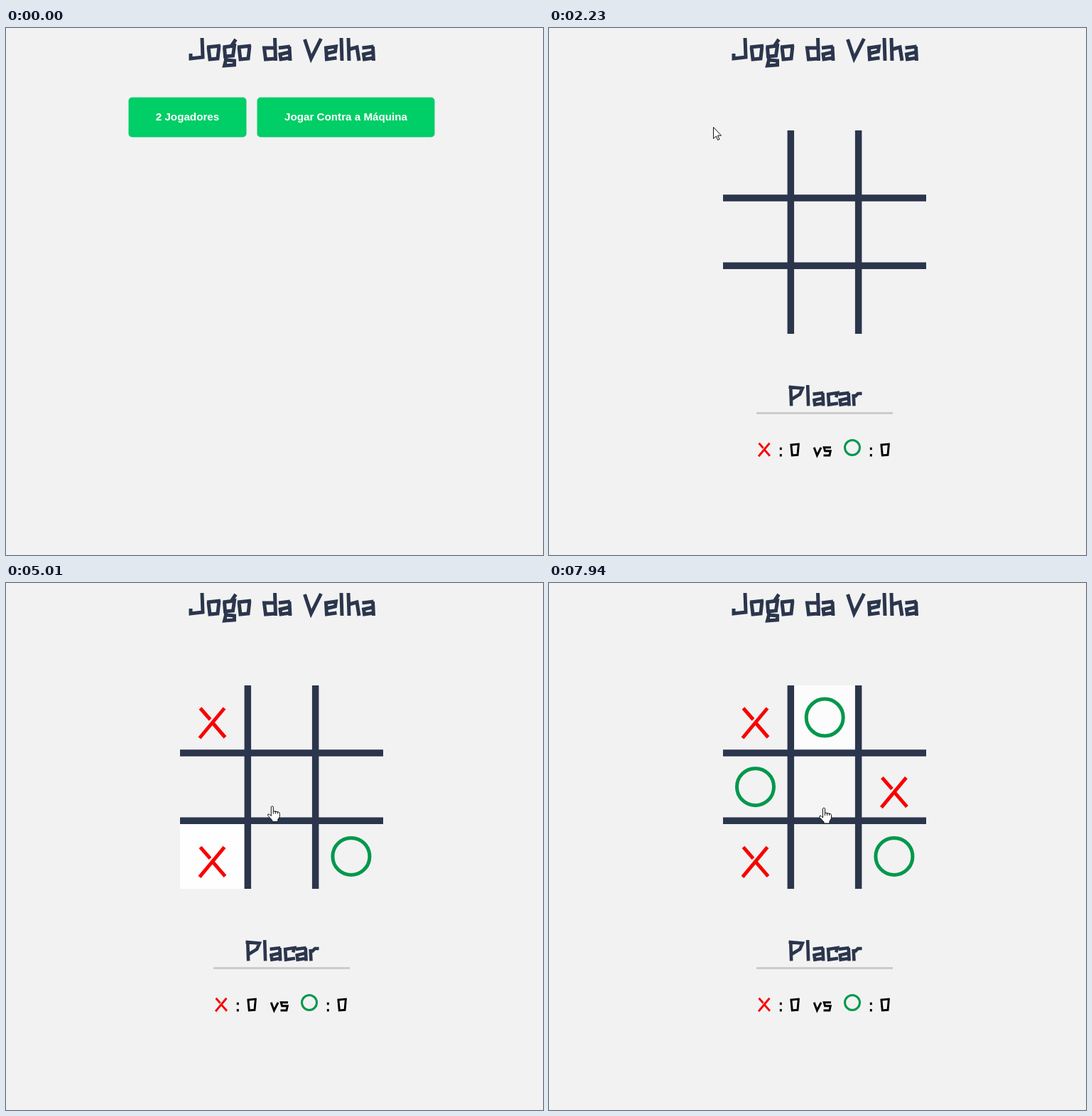
These frames come from a looping animation (756 by 741 pixels, 8000 ms). An HTML page:

```html
<!DOCTYPE html>
<html lang="pt-BR">
<head>
<meta charset="utf-8">
<title>Jogo da Velha</title>
<style>
  html, body { margin: 0; width: 100%; height: 100%; overflow: hidden; background: #f2f2f2; }
  svg { display: block; width: 756px; height: 741px; }
  .ink { fill: none; stroke: #2b364d; }
  .cross { fill: none; stroke: #f80000; }
  .ring { fill: none; stroke: #00984c; }
  #menu text { font: bold 15.2px "Liberation Sans", Arial, sans-serif; fill: #fff; text-anchor: middle; }
  #menu rect { fill: #00ce67; }
  #cursor path { fill: #fff; stroke: #111; stroke-linejoin: round; }
</style>
</head>
<body>
<svg viewBox="0 0 756 741">
  <g id="title"></g>
  <g id="menu">
    <rect id="two" x="172.5" y="97.5" width="166" height="56" rx="5"/>
    <rect x="353.5" y="97.5" width="250" height="56" rx="5"/>
    <text x="255.5" y="130">2 Jogadores</text>
    <text x="478.5" y="130">Jogar Contra a Máquina</text>
  </g>
  <g id="board">
    <g id="cells"></g>
    <g id="bars" class="ink" stroke-width="9.5"></g>
    <g id="marks"></g>
    <path d="M292 541.5H484" stroke="#ccc" stroke-width="3"/>
    <g id="score"></g>
  </g>
  <g id="cursor">
    <path id="arrow" d="M0 0V16L4 12.5 6 18 8.500 17 6 11.700H11Z"/>
    <path id="hand" d="M-1.500 1Q0-1 1.500 1V7L9 8.500Q10.500 9 10.500 11V15L8 19V22H0V20L-6 13.500Q-7 10.500-4 11.500L-1.500 14ZM1.500 7v4m3-4v4m3-3v3"/>
  </g>
</svg>
<script>
const $ = id => document.getElementById(id);
const LOOP = 8000, LEFT = 245, TOP = 144, PITCH = 95.33;

// Angular lettering built from shared strokes, baseline at y = 32
const stem = (x, top = 0) => `M${x} ${top}L${x + 1} 32`;
const bowl = top => `M0 ${top + 2}L19 ${top}M17 ${top}L15 29 4 30 2 ${top + 2}`;
const curl = 'L17 12 3 14 4 30 18 28';
const glyphs = {
  J: 'M18 0L19 27 2 29V22',
  o: bowl(11),
  0: bowl(7),
  g: 'M19 2L13 11M1 13L17 11 15 25 4 26 3 13M5 26V31L17 32V38L3 39 5 31',
  d: stem(17) + 'M17 14H2L4 30 18 29',
  a: stem(16, 12) + 'M1 14L17 12M16 20L3 23 4 30 17 28',
  V: 'M2 2L11 29 25 1',
  v: 'M1 14L7 30 15 14',
  e: 'M3 22L16 19' + curl,
  c: 'M15 19' + curl,
  l: stem(3),
  h: stem(3) + 'M4 16L15 13 18 32',
  P: stem(3, 3) + 'M0 3L21 5 17 14 4 22',
  r: stem(2, 14) + 'M4 18L9 13H15',
  s: 'M17 14H3L5 21H16L14 30H2',
  ':': 'M4 14v5m0 8v5',
  ' ': ''
};
const advance = { J: 25, V: 29, P: 26, l: 10, ' ': 14, c: 18, v: 18 };

function lettering(text, x, y, scale, weight = 5, color = '') {
  let pen = 0, paths = '';
  for (const ch of text) {
    paths += `<path d="${glyphs[ch]}" transform="translate(${pen})"/>`;
    pen += advance[ch] || 21.5;
  }
  return `<g role="img" aria-label="${text}" class="ink" stroke-width="${weight}"
    style="stroke:${color}" transform="translate(${x} ${y}) scale(${scale})">${paths}</g>`;
}

const cross = (x, y, scale = 1, width = 5) =>
  `<path class="cross" stroke-width="${width}" transform="translate(${x} ${y}) scale(${scale})"
    d="M17-21L-18 21M-17-21L-3-5M-1-2L18 20"/>`;
const ring = (x, y, r = 26, width = 5) =>
  `<circle class="ring" stroke-width="${width}" cx="${x}" cy="${y}" r="${r}"/>`;

// Cursor trips: depart, arrive, x, y, and whether a mark is placed
const trips = [
  [70, 830, 231.5, 139.5],
  [2460, 2770, 296, 193, true],
  [2940, 3400, 497.5, 397, true],
  [3860, 4460, 296, 388, true],
  [4850, 5200, 475, 219],
  [5220, 5630, 298, 285, true],
  [6630, 6970, 488, 294, true],
  [7120, 7400, 386, 200, true],
  [7730, 7940, 387, 316]
];

const clamp = v => Math.min(1, Math.max(0, v));
const smooth = p => p * p * (3 - 2 * p);
const show = (node, on) => { node.style.display = on ? '' : 'none'; };

function cursorAt(t) {
  let x = 698, y = 722;
  for (const [depart, arrive, toX, toY] of trips) {
    const p = smooth(clamp((t - depart) / (arrive - depart)));
    x += (toX - x) * p;
    y += (toY - y) * p;
  }
  return [x, y];
}

function cellAt([x, y]) {
  const col = Math.floor((x - LEFT) / PITCH), row = Math.floor((y - TOP) / PITCH);
  return col >= 0 && col < 3 && row >= 0 && row < 3 ? row * 3 + col : -1;
}
const onButton = ([x, y]) => x > 172 && x < 338 && y > 97 && y < 154;

// Share of the last `span` ms for which a test on the cursor held, eased
function dwell(t, span, test) {
  const steps = 40;
  let hits = 0;
  for (let i = 0; i < steps; i++) hits += test(cursorAt(t - i * span / steps));
  return smooth(hits / steps);
}

const marks = trips.filter(trip => trip[4]).map(([, arrive, x, y], i) => {
  const cell = cellAt([x, y]);
  const cx = 290.5 + cell % 3 * 97.7, cy = 189 + Math.floor(cell / 3) * 97.7;
  return { time: arrive + 75, svg: i % 2 ? ring(cx, cy) : cross(cx, cy + 8) };
});

$('title').innerHTML = lettering('Jogo da Velha', 258, 14, 1);
$('bars').innerHTML = [1, 2].map(i =>
  `<path d="M${LEFT + i * PITCH} ${TOP}v286M${LEFT} ${TOP - .3 + i * PITCH}h286"/>`).join('');
$('cells').innerHTML = Array.from({ length: 9 }, (_, i) =>
  `<rect x="${LEFT + i % 3 * PITCH}" y="${TOP + Math.floor(i / 3) * PITCH}"
    width="${PITCH}" height="${PITCH}" fill="#fff"/>`).join('');
$('marks').innerHTML = marks.map(mark => mark.svg).join('');

const scoreText = (text, x) => lettering(text, x, 580, .7, 4.2, '#000');
$('score').innerHTML = lettering('Placar', 337.5, 502, .92)
  + cross(303, 593, .44, 6.5) + scoreText(':', 323.5) + scoreText('0', 339.5)
  + scoreText('vs', 372.5)
  + ring(427, 590, 10.5, 3) + scoreText(':', 450.5) + scoreText('0', 466.5);

function draw(t) {
  const at = cursorAt(t), menu = t < 1610, board = t >= 2230;
  show($('menu'), menu);
  show($('board'), board);

  const press = dwell(t, 200, onButton);
  $('two').style.fill = `rgb(0 ${206 - 53 * press} ${103 - 26 * press})`;

  if (board) {
    [...$('cells').children].forEach((rect, i) => {
      rect.style.opacity = dwell(t, 400, point => cellAt(point) === i);
    });
    [...$('marks').children].forEach((mark, i) => show(mark, t >= marks[i].time));
  }

  const pointing = t < 1700 ? onButton(at) : board && cellAt(at) >= 0;
  show($('cursor'), t >= 70);
  show($('hand'), pointing);
  show($('arrow'), !pointing);
  $('cursor').setAttribute('transform', `translate(${at})`);
}

const start = performance.now();
(function tick() {
  draw((performance.now() - start) % LOOP);
  requestAnimationFrame(tick);
})();
</script>
</body>
</html>
```
